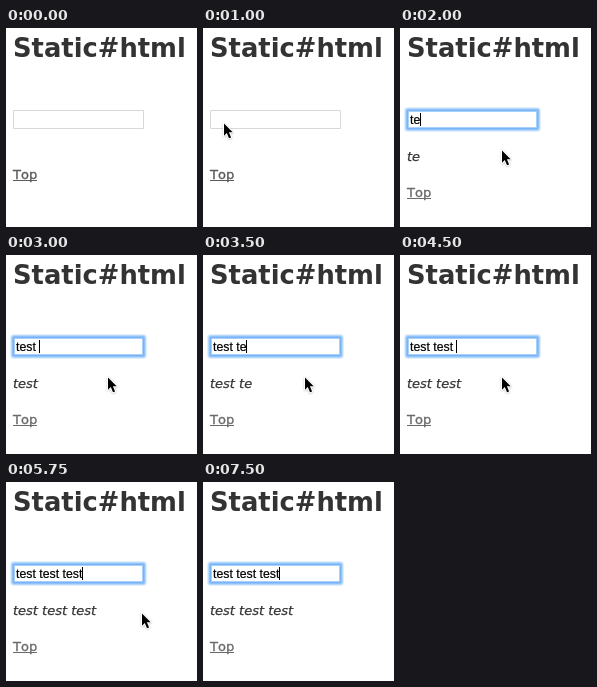
An HTML page with a canvas for the animation above (7.75 s loop, 191 px wide and 199 px high).

```html
<!DOCTYPE html>
<html lang="en">
<head>
<meta charset="utf-8">
<title>Live text field</title>
<style>
html, body { margin: 0; width: 100%; height: 100%; overflow: hidden; background: #fff; }
canvas { display: block; }
</style>
</head>
<body>
<canvas id="stage" width="191" height="199"></canvas>
<script>
const ctx = document.getElementById('stage').getContext('2d');
const TICK = 250;
const LOOP = 7750;
const PHRASE = 'test test test';
const SANS = '"DejaVu Sans", sans-serif';
const FIELD_FONT = '12.3px "Liberation Sans", sans-serif';
const FIELD = { x: 7, y: 82, w: 131, h: 19 };

// Pointer stops: first tick and tip position; null hides it.
const POINTER = [
  [0, null],
  [1, [162, 70]],
  [2, [105, 78]],
  [3, [50, 88]],
  [4, [21, 95.5]],
  [6, [102, 122.5]],
  [23, [136, 131.5]],
  [24, null]
];
const ARROW = [[0, 0], [0, 12.2], [2.8, 9.6], [5, 14.8], [7.1, 13.9], [4.9, 8.8], [8.7, 8.8]];

// Weight adds a hairline outline, like heavier font smoothing.
function label(text, x, y, font, color, weight = 0) {
  ctx.font = font;
  ctx.fillStyle = ctx.strokeStyle = color;
  ctx.fillText(text, x, y);
  if (weight) {
    ctx.lineWidth = weight;
    ctx.strokeText(text, x, y);
  }
}

// One key per tick, with a rest before each new word.
function typedAt(tick) {
  const keys = Math.min(tick, 22) - 6 - (tick >= 11) - (tick >= 17);
  return PHRASE.slice(0, Math.max(0, keys));
}

function caretOn(tick) {
  return tick >= 5 && (tick < 24 || Math.floor(tick / 2) % 2 === 1);
}

function fillFrame(grow, color) {
  const { x, y, w, h } = FIELD;
  ctx.fillStyle = color;
  ctx.beginPath();
  ctx.roundRect(x - grow, y - grow, w + 2 * grow, h + 2 * grow, Math.max(0, grow + 1));
  ctx.fill();
}

function drawField(text, focused, caret) {
  if (focused) {
    [0.18, 0.3, 0.45, 0.45].forEach((alpha, i) => {
      fillFrame(3 - i, `rgba(92, 165, 245, ${alpha})`);
    });
    fillFrame(-1, '#a9d0fa');
    fillFrame(-2, '#fff');
  } else {
    fillFrame(0, '#d8d8d8');
    fillFrame(-1, '#fff');
  }
  label(text, 10, 96, FIELD_FONT, '#000', 0.2);
  if (caret) {
    const end = 10 + ctx.measureText(text).width;
    ctx.fillRect(Math.round(end), 85, 1, 13);
  }
}

function drawLink(y, color) {
  label('Top', 7, y, `13px ${SANS}`, color, 0.35);
  ctx.fillRect(7, y + 1, 24, 1);
}

function drawPointer(tick) {
  const tip = POINTER.filter(stop => stop[0] <= tick).pop()[1];
  if (!tip) return;
  ctx.save();
  ctx.translate(tip[0], tip[1]);
  ctx.beginPath();
  ARROW.forEach(([x, y]) => ctx.lineTo(x, y));
  ctx.closePath();
  ctx.lineJoin = 'round';
  ctx.lineWidth = 2;
  ctx.strokeStyle = '#fff';
  ctx.shadowColor = 'rgba(0, 0, 0, 0.25)';
  ctx.shadowBlur = 2;
  ctx.shadowOffsetY = 0.5;
  ctx.stroke();
  ctx.shadowColor = 'transparent';
  ctx.fillStyle = '#000';
  ctx.fill();
  ctx.restore();
}

function draw(time) {
  const tick = Math.floor((time % LOOP) / TICK);
  const text = typedAt(tick);
  ctx.fillStyle = '#fff';
  ctx.fillRect(0, 0, 191, 199);
  ctx.fontKerning = 'none';
  label('Static#html', 7, 29, `bold 25.8px ${SANS}`, '#333');
  drawField(text, tick >= 5, caretOn(tick));
  label(text, 7, 133, `italic 13px ${SANS}`, '#333', 0.25);
  drawLink(text ? 169 : 151, text ? '#6a6a6a' : '#5a5a5a');
  drawPointer(tick);
}

const start = performance.now();
function loop() {
  draw(performance.now() - start);
  requestAnimationFrame(loop);
}
loop();
</script>
</body>
</html>
```
